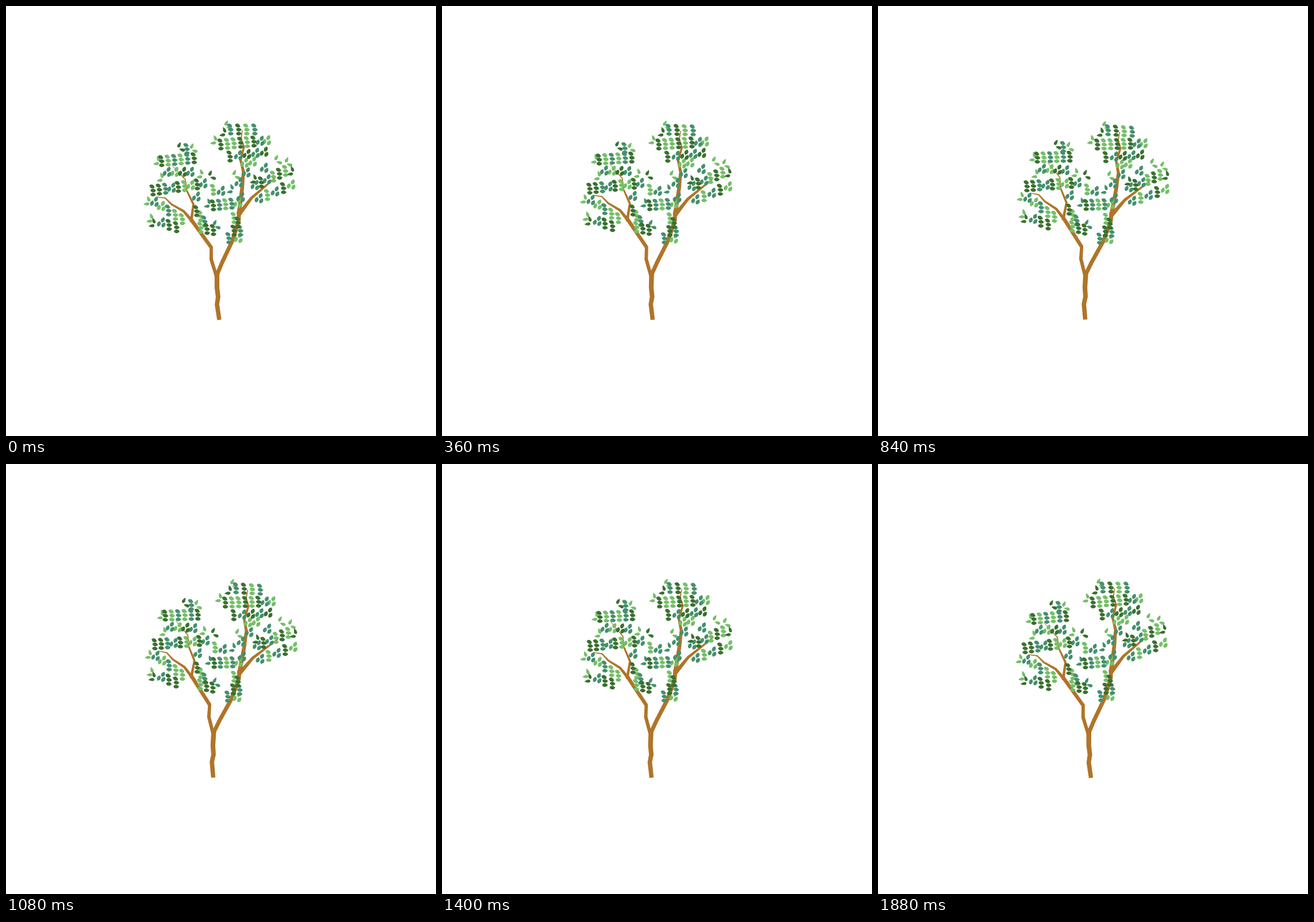
Write an HTML page with a canvas that moves like this. It is 748 by 748 pixels and loops after 1.92 s.

```html
<!DOCTYPE html>
<html lang="en">
<head>
<meta charset="utf-8">
<title>Swaying tree</title>
<style>
html, body { margin: 0; width: 100%; height: 100%; overflow: hidden; background: #fff }
canvas { display: block }
</style>
</head>
<body>
<canvas id="stage" width="748" height="748"></canvas>
<script>
const ctx = document.getElementById('stage').getContext('2d');
const SIZE = 748, LOOP = 1920, STEP = 40, SWAY = 4;
const BARK = '#b07429';
const GREENS = { d: '#3a702f', t: '#45906d', l: '#75bf69' };

const oval = new Path2D('M-4.9 .4C-3.5-3.9 1.5-4.6 4.9-.4C3 4.2-2.5 4.4-4.9 .4Z');
const tear = new Path2D('M-4.3 1C-4.2-3.4 .5-3 6-.8C2 3.2-3 4.3-4.3 1Z');

// Leaves of a sprig: x offset, y offset, tilt in degrees
const STACK = [[-1, -7, 25], [1, 0, 8], [1, 7, 2]];
const TRIO = [[3, -5, -62], [-4, 2, -68], [4, 4, -55]];

// Evenly spaced sprigs: start, spacing, then a green for each; capitals are trios
const crownTop = [
  [390, 215, 14, 0, 'tdlt'], [373, 241, 11.5, -1, 'dlldldTL'],
  [389, 262, 15, -2, 'dTDTD'], [415, 273, 14, -2, 'LL'], [418, 290, 0, 0, 'T']
];
const crownLeft = [
  [314, 249, 0, 0, 't'], [270, 270, 11.3, -1, 'dltltd'], [280, 289, 13.5, 0, 'TLDT'],
  [255, 321, 11, -1.5, 'ddtTdlLdT'], [258, 341, 12, 7.5, 'TLtll'], [270, 377, 13, 4, 'Tdd']
];
const crownMiddle = [
  [331, 332, 0, 0, 'T'], [331, 357, 7, 9, 'dlt'], [338, 386, 11, 2, 'ldd'],
  [360, 320, 14, 2, 'lT'], [360, 347, 10.7, -1, 'dtltL'], [405, 307, 3, 26, 'TT'],
  [396, 369, 7, 8, 'ld'], [396, 391, 11, 0, 'dt'], [387, 404, 17, 0, 'tL']
];
const crownRight = [
  [449, 282, 0, 0, 'T'], [433, 312, 10.5, -5, 'TdTldl'], [440, 335, 14, -6, 'TlTdL']
];

// Pointed pairs at the rim, with the side the lower leaf grows on
const rim = [
  [383, 204, 'l>'], [380, 216, 'd<'], [364, 230, 'l<'], [301, 242, 'd>'], [323, 244, 'l>'],
  [265, 266, 'l<'], [271, 295, 'l<'], [248, 336, 'l<'], [253, 366, 'l<'], [257, 374, 'd<'],
  [340, 289, 'l<'], [355, 291, 'd>'], [353, 340, 't<'], [363, 377, 't>'], [393, 315, 't<'],
  [397, 290, 'l>'], [433, 298, 'd<'], [470, 264, 'l>'], [488, 268, 'l>'], [498, 284, 'd<']
];

function limb(from, to, points) {
  const left = [], right = [], last = points.length - 1;
  points.forEach(([x, y], i) => {
    const a = points[Math.max(0, i - 1)], b = points[Math.min(last, i + 1)];
    const dx = b[0] - a[0], dy = b[1] - a[1];
    const k = (from + (to - from) * i / last) / 2 / Math.hypot(dx, dy);
    left.push([x - dy * k, y + dx * k]);
    right.unshift([x + dy * k, y - dx * k]);
  });
  return new Path2D('M' + left.concat(right).join('L') + 'Z');
}

const trunk = limb(7.5, 8.5, [[371, 546], [367, 519], [369, 506], [367, 490], [367, 466]]);
const rightFork = limb(7, 7, [[366, 470], [376, 446], [394, 408], [405, 372], [405, 357]]);
const topBranch = limb(7.5, 1.3,
  [[405, 363], [411, 315], [413, 288], [408, 268], [414, 245], [409, 231], [411, 216]]);
const rightBranch = limb(7.5, 2.5, [[405, 363], [427, 334], [468, 299]]);
const leftFork = limb(6, 6.5, [[366, 470], [357, 441], [357, 420], [321, 370]]);
const lowBranch = limb(5.5, 1.2, [[322, 372], [309, 357], [288, 345], [277, 334], [262, 332]]);
const highBranch = limb(5, .8, [[322, 376], [326, 345], [314, 320], [312, 302], [289, 277]]);
const bark = [trunk, rightFork, topBranch, rightBranch, leftFork, lowBranch, highBranch];

const foliage = { l: new Path2D(), t: new Path2D(), d: new Path2D() };

function addLeaf(green, shape, x, y, tilt) {
  foliage[green].addPath(shape, new DOMMatrix().translate(x, y).rotate(tilt));
}

for (const [x, y, stepX, stepY, sprigs] of [...crownTop, ...crownLeft, ...crownMiddle, ...crownRight]) {
  [...sprigs].forEach((sprig, i) => {
    const green = sprig.toLowerCase();
    for (const [dx, dy, tilt] of sprig === green ? STACK : TRIO) {
      addLeaf(green, oval, x + i * stepX + dx, y + i * stepY + dy, tilt);
    }
  });
}

for (const [x, y, [green, side]] of rim) {
  const right = side === '>';
  addLeaf(green, tear, x, y, right ? -55 : -105);
  addLeaf(green, tear, x + (right ? 6 : -3), y + 8.5, right ? 205 : 180);
}

function draw(now) {
  const time = Math.floor(now % LOOP / STEP) * STEP;
  const swing = 1 - Math.abs(1 - 2 * time / LOOP);
  ctx.resetTransform();
  ctx.fillStyle = '#fff';
  ctx.fillRect(0, 0, SIZE, SIZE);
  ctx.translate(SIZE / 2, SIZE / 2);
  ctx.rotate(SWAY * swing * Math.PI / 180);
  ctx.translate(-SIZE / 2, -SIZE / 2);
  ctx.fillStyle = BARK;
  bark.forEach(path => ctx.fill(path));
  for (const green in foliage) {
    ctx.fillStyle = GREENS[green];
    ctx.fill(foliage[green]);
  }
}

const start = performance.now();
function tick() {
  draw(performance.now() - start);
  requestAnimationFrame(tick);
}
tick();
</script>
</body>
</html>
```
